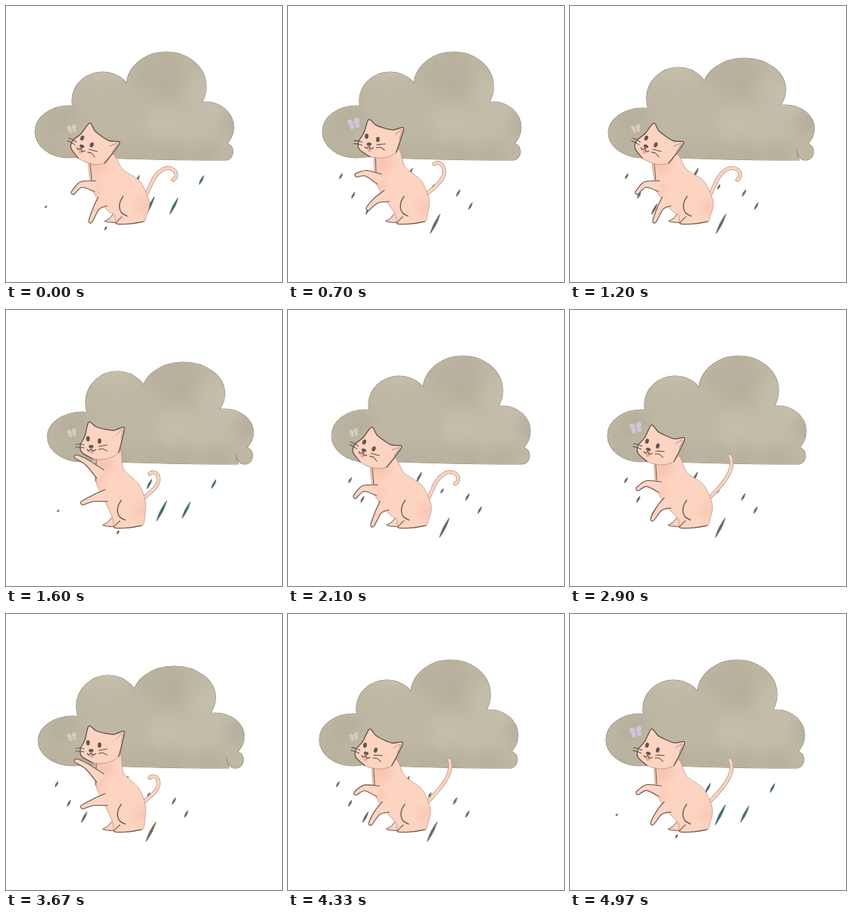
Recreate the animation shown at these times as an HTML page with a canvas. Size 360 by 360 pixels, loop 5 s.

```html
<!DOCTYPE html>
<html lang="en">
<head>
<meta charset="utf-8">
<title>Cat under a rain cloud</title>
<style>
html, body { margin: 0; width: 100%; height: 100%; overflow: hidden; background: #fff; }
canvas { display: block; width: 360px; height: 360px; }
</style>
</head>
<body>
<canvas id="stage" width="360" height="360"></canvas>
<script>
const ctx = document.getElementById('stage').getContext('2d');
const LOOP = 5000, STEP = 129.2, STEP_SHIFT = 40;
const SWAY = 4000, PUFF = 2000, SHOWER = 800;
const INK = '#65564f', SKIN = '#fdd4c2', EDGE = '#b08d7e', BLUSH = '241,174,148';

function fill(color) { ctx.fillStyle = color; ctx.fill(); }
function stroke(color, width) {
  ctx.strokeStyle = color;
  ctx.lineWidth = width;
  ctx.stroke();
}
// Smooth curve through the points.
function curve(pts, closed) {
  const n = pts.length;
  const at = i => closed ? pts[(i + n) % n] : pts[Math.max(0, Math.min(n - 1, i))];
  ctx.beginPath();
  ctx.moveTo(...pts[0]);
  for (let i = 0; i < (closed ? n : n - 1); i++) {
    const [a, b, c, d] = [at(i - 1), at(i), at(i + 1), at(i + 2)];
    ctx.bezierCurveTo(b[0] + (c[0] - a[0]) / 7, b[1] + (c[1] - a[1]) / 7,
      c[0] - (d[0] - b[0]) / 7, c[1] - (d[1] - b[1]) / 7, ...c);
  }
}
function line(pts, color = INK, width = 1.3) { curve(pts); stroke(color, width); }
function dot(x, y, rx, ry, color, angle = 0) {
  ctx.beginPath();
  ctx.ellipse(x, y, rx, ry, angle, 0, Math.PI * 2);
  fill(color);
}
function wash(x, y, r, rgb, alpha) {
  const g = ctx.createRadialGradient(x, y, 0, x, y, r);
  g.addColorStop(0, `rgba(${rgb},${alpha})`);
  g.addColorStop(1, `rgba(${rgb},0)`);
  ctx.fillStyle = g;
  ctx.fillRect(x - r, y - r, 2 * r, 2 * r);
}
function seeded(seed) {
  return () => (seed = seed * 16807 % 2147483647) / 2147483647;
}

// Lobes: centre, radii and how far the top sinks when the cloud spreads.
const lobes = [[45, 164, 44, 34, 3], [89, 124, 40, 38, -6], [172, 105, 52, 45, 8],
  [223, 158, 37, 33, 4], [249, 190, 10, 11, 0]];

function cloudPath(spread) {
  const path = new Path2D();
  const wide = 1 + .037 * spread;
  for (const [x, y, rx, ry, sink] of lobes) {
    const lobe = new Path2D();
    lobe.ellipse(x * wide, y + sink * spread / 2, rx * wide, ry - sink * spread / 2, 0, 0, 7);
    path.addPath(lobe);
  }
  path.addPath(new Path2D('M60 130 L225 130 L250 201 Q130 201 32 195 Z'));
  return path;
}

function drawCloud(left, spread) {
  const path = cloudPath(spread), random = seeded(77);
  ctx.save();
  ctx.translate(left, 0);
  ctx.strokeStyle = '#8f8775';
  ctx.lineWidth = 1.2;
  ctx.stroke(path);
  ctx.fillStyle = '#beb7a4';
  ctx.fill(path);
  ctx.clip(path);
  for (let i = 0; i < 18; i++) {
    const tone = i % 2 ? '204,198,181' : '172,164,146';
    wash(random() * 265, 65 + random() * 135, 25 + random() * 28, tone, .35);
  }
  for (let x = 20; x < 260; x += 40) wash(x, 196, 30, '166,158,140', .3);
  ctx.restore();
}

// Drops: x and y from the cloud's left edge, length.
const fineRain = [[25, 222, 8], [41, 247, 9], [61, 265, 16], [115, 218, 15],
  [145, 236, 7], [178, 244, 10], [194, 261, 10], [148, 284, 29]];
const heavyRain = [[15, 262, 3], [93, 290, 5], [134, 227, 14], [150, 262, 30],
  [182, 261, 24], [218, 227, 13]];

function drawRain(drops, left, color) {
  for (const [x, y, length] of drops) {
    const dx = length * .22, dy = length * .44, cx = x + left;
    const half = 1.1 + length * .02;
    curve([[cx + dx, y - dy], [cx + half, y], [cx - dx, y + dy], [cx - half, y]], true);
    fill(color);
    stroke(color, .7);
  }
}

function drawButterfly(aloft) {
  const color = aloft ? '#d0c5d6' : '#d8cbbd', size = aloft ? 1 : .75;
  ctx.save();
  ctx.translate(86, aloft ? 153 : 160);
  ctx.rotate(-.25);
  ctx.scale(size, size);
  for (const side of [-1, 1]) {
    dot(side * 4.2, -2, 3.6, 4.6, color, side * .4);
    dot(side * 3.6, 4, 3, 3, color);
  }
  ctx.restore();
}

// A limb tapering to the paw, open at the shoulder.
function drawLimb(joints, shoulder, paw) {
  const last = joints.length - 1;
  const side = sign => joints.map(([x, y], i) => {
    const a = joints[Math.max(0, i - 1)], b = joints[Math.min(last, i + 1)];
    const angle = Math.atan2(b[1] - a[1], b[0] - a[0]) + sign * Math.PI / 2;
    const r = shoulder + (paw - shoulder) * Math.sqrt(i / last);
    return [x + r * Math.cos(angle), y + r * Math.sin(angle)];
  });
  const outline = [...side(1), ...side(-1).reverse()];
  curve(outline, true);
  fill(SKIN);
  line(outline, INK, 1.1);
}

// The curl flips from inward to outward as the cat crouches.
function drawTail(x, y, crouch) {
  const curl = 180 - 390 * crouch ** 4, length = 48 + 20 * crouch, parts = 24;
  const pts = [[x, y]];
  for (let i = 1; i <= parts; i++) {
    const angle = (52 - curl * .07 + curl * (i / parts) ** 3) * Math.PI / 180;
    x += Math.cos(angle) * length / parts;
    y -= Math.sin(angle) * length / parts;
    pts.push([x, y]);
  }
  line(pts, EDGE, 5);
  line(pts, SKIN, 3.6);
}

function drawHead(x, y, tilt) {
  const earL = [[-8, -14], [-3, -32], [8, -25]];
  const earR = [[29, -21], [43, -25], [40, -7]];
  const jaw = [[36, 8], [21, 16], [2, 16], [-12, 8], [-14, -2]];
  ctx.save();
  ctx.translate(x, y);
  ctx.rotate(tilt);
  curve([...earL, ...earR, ...jaw], true);
  fill(SKIN);
  stroke(EDGE, .7);
  line([...jaw.slice(2), ...earL, ...earR, jaw[0]]);
  line([[33, -15], [41, -22], [39, -10]], '#b9968a', 1);
  dot(-4, -10, 2.4, 3.4, INK);
  dot(11, -7, 2.4, 3.4, INK);
  dot(0, 0, 3.2, 2.1, INK);
  dot(1, 7, 2.4, 3, '#eaa79c');
  line([[-5, 4], [-3, 6], [0, 3], [3, 6], [6, 4]]);
  for (const drop of [0, 4]) {
    line([[10, drop], [15, drop - 1], [21, drop * 2 - 2]], INK, 1.1);
    line([[-9, drop - 2], [-14, drop - 3], [-20, drop - 3]], INK, 1.1);
  }
  ctx.restore();
}

function drawCat(crouch) {
  // Each joint: place when upright, then its shift when fully crouched.
  const pose = (joints, k = crouch) => joints.map(([x, y, dx, dy]) => [x + dx * k, y + dy * k]);
  const front = pose([[118, 190, -9, 6], [117, 223, -4, 17], [130, 251, 2, 15]]);
  const back = pose([[182, 250, 5, 6], [173, 227, 2, 2], [153, 207, -1, 6], [148, 182, -10, 10]]);
  const raised = pose([[123, 214, -7, 21], [106, 199, -8, 34], [91, 191, -4, 53]], crouch ** .7);
  const lower = pose([[131, 242, -5, 13], [113, 246, 5, 17], [99, 252, 11, 29]]);
  const [nose] = pose([[111, 178, -12, 5]]);
  const hip = (crouch - 1) * 2.5;
  const hind = pts => pts.map(([x, y]) => [x + hip, y]);

  drawTail(181 + 3 * crouch, 244, crouch);
  curve(hind([[142, 270], [135, 277], [129, 281], [148, 282], [155, 272]]), true);
  fill(SKIN);
  stroke(INK, 1);

  curve([...front, ...hind([[142, 273], [144, 284], [162, 284], [180, 281], [183, 274]]), ...back], true);
  fill(SKIN);
  stroke(EDGE, .7);
  ctx.save();
  ctx.clip();
  wash(front[0][0] + 10, front[0][1] + 12, 20, BLUSH, .45);
  wash(...front[1], 18, BLUSH, .35);
  wash(181 + hip, 262, 20, BLUSH, .3);
  ctx.restore();
  line(front.slice(0, 2), INK, 1);

  drawLimb(raised, 7, 2.3);
  drawLimb(lower, 8, 2.3);
  line(hind([[153, 248], [149, 255], [148, 263], [151, 270], [158, 274]]));
  line(hind([[151, 275], [146, 280], [144, 284], [162, 284], [180, 281]]), INK, 1.1);
  drawHead(...nose, .42 * crouch ** 2);
}

// Four steps up, three quicker ones down.
function crouchAt(step) {
  return step <= 4 ? 1 - step / 4 : ((step - 4) / 3) ** .75;
}

function draw(t) {
  ctx.fillStyle = '#fff';
  ctx.fillRect(0, 0, 360, 360);
  ctx.lineCap = ctx.lineJoin = 'round';

  const step = (Math.floor((t - STEP_SHIFT) / STEP) + 8) % 8;
  const aloft = step === 5 || step === 6;
  const held = Math.floor(t / 100) * 100;
  const left = 57 - 20 * Math.abs(1 - 2 * (held % SWAY) / SWAY);
  const puff = t % PUFF;
  const heavy = t % SHOWER < 330;

  drawCloud(left, puff >= 1200 && puff < 1900 ? 1 : 0);
  drawRain(heavy ? heavyRain : fineRain, left, heavy ? '#456c6b' : '#70665f');
  drawButterfly(aloft);
  drawCat(crouchAt(step));
}

const start = performance.now();
function tick() {
  draw((performance.now() - start) % LOOP);
  requestAnimationFrame(tick);
}
tick();
</script>
</body>
</html>
```
